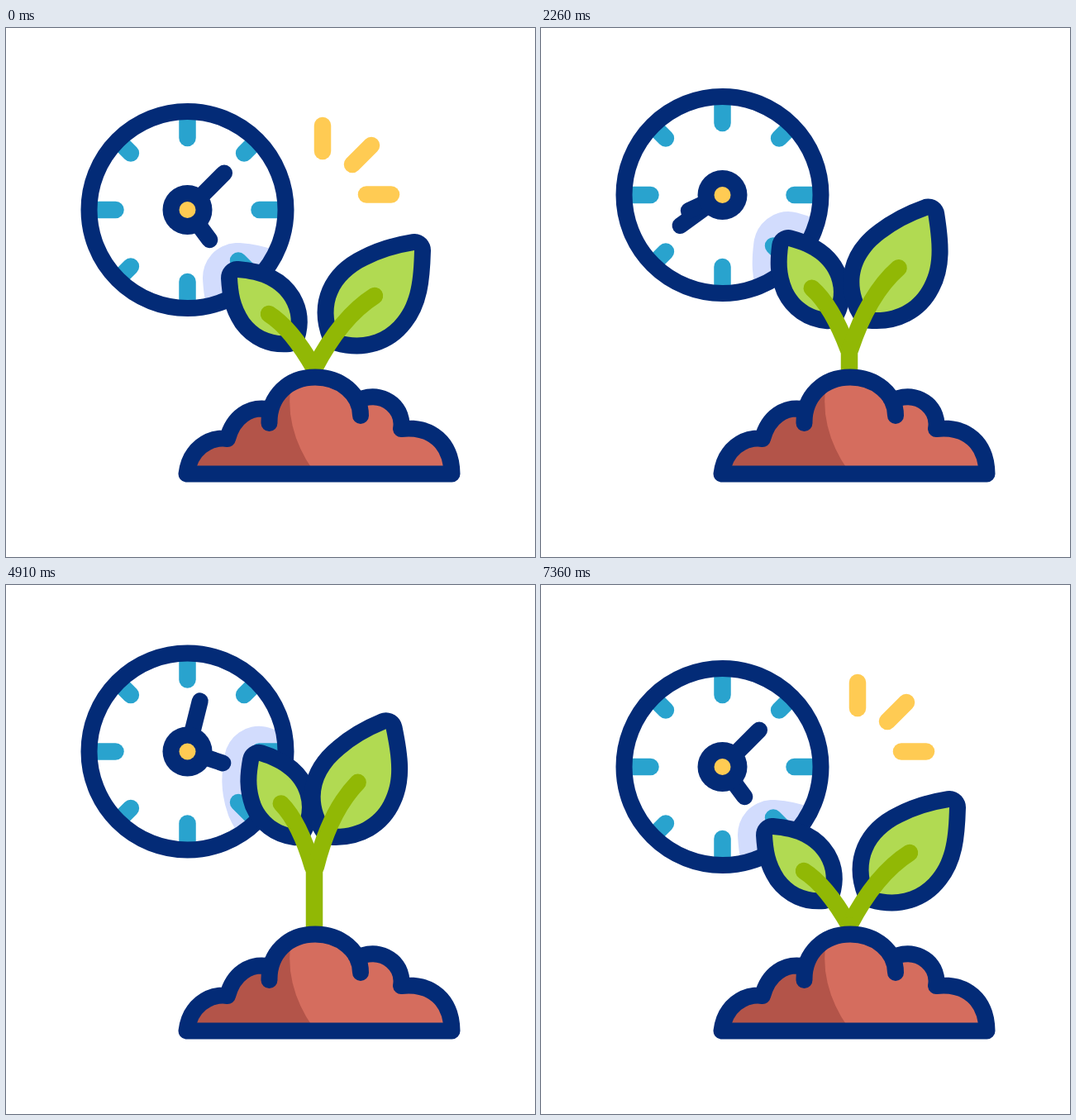
An HTML page for the animation above (8670 ms loop, 640 px wide and 640 px high).

```html
<!DOCTYPE html>
<html lang="en">
<head>
<meta charset="utf-8">
<title>Growing plant and clock</title>
<style>
  html, body { margin: 0; height: 100%; overflow: hidden; background: #fff; }
  svg { display: block; width: 100vw; height: 100vh; }
  .line { fill: none; stroke: #032b77; stroke-width: 20; stroke-linecap: round; stroke-linejoin: round; }
  .leaf { fill: #b1da52; stroke: #032b77; stroke-width: 40; stroke-linejoin: round; paint-order: stroke; }
  .vein { fill: none; stroke: #91b805; stroke-width: 20.5; stroke-linecap: round; }
  .ray { stroke: #ffcb53; stroke-width: 20.5; stroke-linecap: round; }
  .shade { fill: #d2dcfd; stroke: #d2dcfd; stroke-width: 84; stroke-linejoin: round; }
  #ticks { stroke: #29a3ce; stroke-width: 20.5; stroke-linecap: round; }
</style>
</head>
<body>
<svg viewBox="0 0 640 640">
  <defs>
    <path id="leafL" d="M280 302C308 304 327 313 338 331Q349 350 342 372C322 374 305 366 294 351C283 334 281 320 280 302Z"/>
    <path id="leafR" d="M494 269Q462 274 437 287C402 304 388 335 402 371C432 380 458 371 474 350C490 330 493 305 494 269Z"/>
    <clipPath id="face"><circle id="faceHole" cx="219.5" cy="220" r="112"/></clipPath>
  </defs>

  <g clip-path="url(#face)">
    <g class="branchL"><use class="shade bladeL" href="#leafL"/></g>
  </g>
  <g id="clock">
    <g id="ticks"></g>
    <circle class="line" r="119"/>
    <path id="minute" class="line" d="M0 0V-63"/>
    <path id="hour" class="line" d="M0 0V-45"/>
    <circle r="30" fill="#032b77"/>
    <circle r="10" fill="#ffcb53"/>
  </g>

  <g id="rays"></g>

  <g id="plant">
    <g class="branchL"><use class="leaf bladeL" href="#leafL"/></g>
    <g class="branchR"><use class="leaf bladeR" href="#leafR"/></g>
    <path class="branchL vein" d="M318 346Q345 363 373 412"/>
    <path class="branchR vein" d="M446 324Q405 350 373 412"/>
    <path id="stem" class="vein"/>
  </g>

  <g id="soil">
    <path fill="#d56d5e" d="M218.5 539.5C222 510 245 494 268 497C275 470 295 458 320 461C326 437 346 423 374 423C400 423 422 436 428 450C460 440 482 462 478 485C515 481 539 502 539.5 539.5Z"/>
    <path fill="#b35449" d="M218.5 539.5C222 510 245 494 268 497C275 470 295 458 320 461C324 445 334 436 345 430Q336 485 372 536Z"/>
    <path class="line" d="M268 497C245 494 222 510 218.5 539.5H539.5C539 502 515 481 478 485C482 462 460 440 432 448M268 497C275 470 295 458 316 461M318.500 478C318 445 342 422.500 374 422.500C405 422.500 429 443 429 469"/>
  </g>
</svg>
<script>
const LOOP = 8670, START = 610, STEP = 50;
const $ = id => document.getElementById(id);
const each = (cls, value) => document.querySelectorAll('.' + cls)
  .forEach(el => el.setAttribute('transform', value));

// [time, value] keys for each moving quantity
const clockY = [[600, 220], [1460, 215.5], [2260, 202], [3260, 195], [4250, 191],
  [4910, 201.5], [5060, 208], [5450, 220.5], [5710, 218.5], [6150, 208], [6850, 220]];
const minute = [[600, 45], [1460, 52.5], [2260, 234], [3660, 740], [4910, 1094], [5710, 1125.5], [6300, 1125]];
const hour = [[600, 143.5], [1460, 143], [2260, 245], [3660, 573], [4910, 828], [5710, 870.5], [6500, 863.5]];
const height = [[600, 404], [1460, 385.5], [2260, 380.7], [3660, 349], [4910, 333.5],
  [5500, 414], [5710, 411.5], [6200, 400], [6850, 404]];
const sway = [[600, 0], [1460, 3], [2260, -9], [3660, -12.2], [4910, -13.3],
  [5560, 13.5], [5710, 11.7], [6250, -4], [6850, 1], [7350, 0]];
const bend = [[600, 0], [1460, .8], [2260, -1.5], [3660, 0], [4910, 0], [5710, 2.5], [6250, -1], [7350, 0]];
const glow = [[600, 1], [950, 0], [5300, 0], [5650, 1]];

// Smooth curve through the keys, flat at the ends and turning points
function slope(keys, i) {
  const a = keys[i - 1], b = keys[i], c = keys[i + 1];
  if (!a || !c) return 0;
  const m = (b[1] - a[1]) / (b[0] - a[0]), n = (c[1] - b[1]) / (c[0] - b[0]);
  return m * n <= 0 ? 0 : 2 * m * n / (m + n);
}
function at(keys, t) {
  const i = keys.findIndex(k => k[0] > t);
  if (i === 0) return keys[0][1];
  if (i < 0) return keys[keys.length - 1][1];
  const [t0, a] = keys[i - 1], [t1, b] = keys[i], d = t1 - t0, u = (t - t0) / d, v = 1 - u;
  return a * v * v * (1 + 2 * u) + b * u * u * (3 - 2 * u)
    + d * u * v * (slope(keys, i - 1) * v - slope(keys, i) * u);
}

function addLine(parent, attrs) {
  const el = document.createElementNS('http://www.w3.org/2000/svg', 'line');
  for (const k in attrs) el.setAttribute(k, attrs[k]);
  return $(parent).appendChild(el);
}
for (let i = 0; i < 8; i++) {
  const inner = i % 2 && i !== 3 ? 97 : 87;
  addLine('ticks', { y1: -inner, y2: -115, transform: `rotate(${i * 45})` });
}
const rays = [[383, 149, 383, 118], [419, 165, 442, 142], [436, 201.5, 466, 201.5]]
  .map(p => ({ p, el: addLine('rays', { class: 'ray', x1: p[0], y1: p[1] }) }));

function draw(t) {
  const cy = at(clockY, t);
  $('clock').setAttribute('transform', `translate(219.5 ${cy})`);
  $('faceHole').setAttribute('cy', cy);
  $('minute').setAttribute('transform', `rotate(${at(minute, t)})`);
  $('hour').setAttribute('transform', `rotate(${at(hour, t)})`);

  const y = at(height, t), a = at(sway, t), b = at(bend, t);
  each('branchL', `translate(0 ${y - 404}) rotate(${-a} 373 404)`);
  each('branchR', `translate(0 ${y - 404}) rotate(${a} 373 404)`);
  each('bladeL', `rotate(${-b} 342 372)`);
  each('bladeR', `rotate(${b} 402 371)`);
  $('stem').setAttribute('d', `M373 ${y + 8}V440`);

  const g = at(glow, t);
  $('rays').style.display = g > 0 ? '' : 'none';
  for (const { p: [x1, y1, x2, y2], el } of rays) {
    el.setAttribute('x2', x1 + (x2 - x1) * g);
    el.setAttribute('y2', y1 + (y2 - y1) * g);
    el.setAttribute('stroke-opacity', Math.min(1, g * 4));
  }
}

let begin;
function frame(now) {
  begin ??= now;
  const t = (now - begin) % LOOP;
  draw(t < START ? 0 : START + Math.floor((t - START) / STEP) * STEP);
  requestAnimationFrame(frame);
}
draw(0);
requestAnimationFrame(frame);
</script>
</body>
</html>
```
